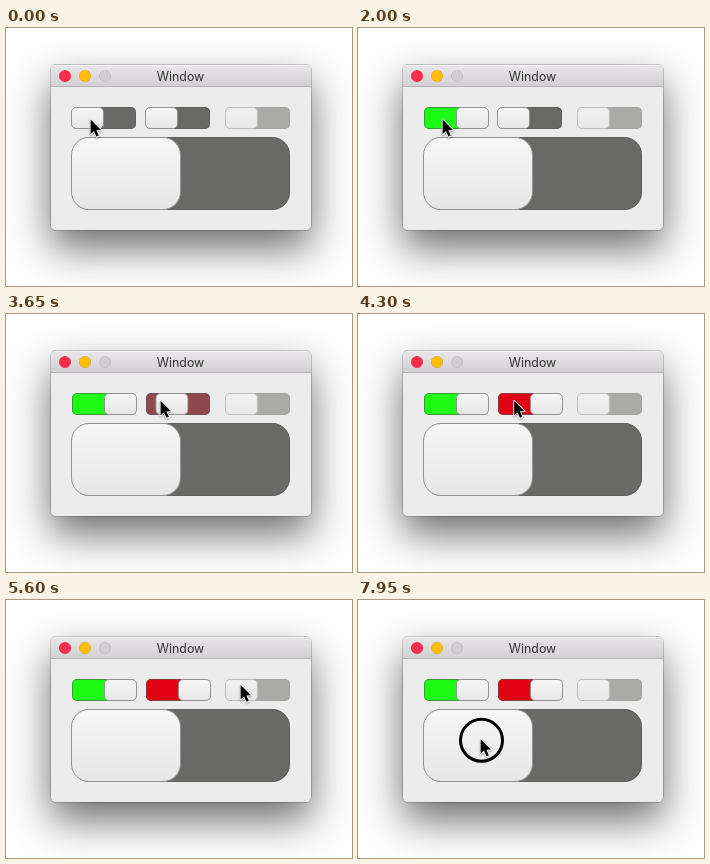
Write an HTML page with a canvas that moves like this. It is 346 px wide and 258 px high and loops after 8 s.

```html
<!DOCTYPE html>
<html lang="en">
<head>
<meta charset="utf-8">
<title>Window</title>
<style>
html, body { margin: 0; width: 100%; height: 100%; overflow: hidden; background: #fff; }
canvas { display: block; width: 346px; height: 258px; }
#title {
  position: absolute; left: 45px; top: 40px; width: 259px;
  font: 400 12.4px/17px Inter, sans-serif; color: #333; text-align: center;
}
</style>
</head>
<body>
<canvas id="stage"></canvas>
<div id="title">Window</div>
<script>
const W = 346, H = 258, LOOP = 8000, STEP = 50;
const canvas = document.getElementById('stage');
const ctx = canvas.getContext('2d');
const dpr = window.devicePixelRatio || 1;
canvas.width = W * dpr;
canvas.height = H * dpr;

const GRAY = [105, 105, 103], GREEN = [28, 252, 20], RED = [226, 0, 20];

// Pointer legs: start, end, from, to, easing power
const legs = [
  [2250, 2850, [84.2, 91.2], [154.2, 86.4], 0.9],
  [4250, 5050, [154.2, 86.4], [234.2, 84.4], 0.9],
  [6400, 7250, [234.2, 84.4], [132, 138.8], 0.8],
  [7250, 7450, [132, 138.8], [122.2, 138.8], 1]
];
// Presses: start of fade in, start of fade out
const presses = [[1100, 1500], [3150, 3450], [5300, 5450], [7800, 9000]];
const FADE = 150;

const progress = (t, a, b) => Math.min(1, Math.max(0, (t - a) / (b - a)));
const smooth = p => p * p * (3 - 2 * p);
const mix = (a, b, p) => a + (b - a) * p;

function roundRect(x, y, w, h, r) {
  ctx.beginPath();
  ctx.roundRect(x, y, w, h, r);
}

function vertical(y, h, top, bottom) {
  const g = ctx.createLinearGradient(0, y, 0, y + h);
  g.addColorStop(0, top);
  g.addColorStop(1, bottom);
  return g;
}

function drawWindow() {
  ctx.fillStyle = '#fff';
  ctx.fillRect(0, 0, W, H);

  ctx.save();
  ctx.shadowColor = 'rgba(0,0,0,0.58)';
  ctx.shadowBlur = 40 * dpr;
  ctx.shadowOffsetY = 18 * dpr;
  ctx.fillStyle = '#ececec';
  roundRect(45, 37, 260, 165, 5);
  ctx.fill();
  ctx.restore();

  ctx.strokeStyle = 'rgba(0,0,0,0.18)';
  ctx.lineWidth = 1;
  roundRect(44.5, 36.5, 261, 166, 5.5);
  ctx.stroke();
  ctx.fillStyle = '#ececec';
  roundRect(45, 37, 260, 165, 5);
  ctx.fill();

  ctx.fillStyle = vertical(37, 21, '#e9e7e9', '#d2d0d2');
  roundRect(45, 37, 260, 21, [5, 5, 0, 0]);
  ctx.fill();
  ctx.fillStyle = '#f5f4f5';
  ctx.fillRect(49, 37, 252, 1);
  ctx.fillStyle = '#b4b2b4';
  ctx.fillRect(45, 58, 260, 1);

  const lights = [['#ff2c50', '#e0203f'], ['#ffbf08', '#e0a300'], ['#d0ced0', '#bcbabc']];
  lights.forEach(([fill, edge], i) => {
    ctx.beginPath();
    ctx.arc(59 + 20 * i, 48, 5.6, 0, 7);
    ctx.fillStyle = fill;
    ctx.fill();
    ctx.strokeStyle = edge;
    ctx.lineWidth = 0.7;
    ctx.stroke();
  });
}

function drawSwitch(x, y, w, h, r, on, color, disabled) {
  const rgb = GRAY.map((c, i) => Math.round(mix(c, color[i], on)));
  ctx.fillStyle = `rgb(${rgb})`;
  roundRect(x, y, w, h, r);
  ctx.fill();
  ctx.strokeStyle = 'rgba(90,90,90,0.65)';
  ctx.lineWidth = 1;
  roundRect(x + 0.5, y + 0.5, w - 1, h - 1, r - 0.5);
  ctx.stroke();

  const kw = w / 2 + 1;
  const kx = mix(x - 1, x + w / 2, on);
  ctx.fillStyle = vertical(y, h, '#f7f7f7', '#e6e6e6');
  roundRect(kx + 0.5, y + 0.5, kw - 1, h - 1, r - 0.5);
  ctx.fill();
  ctx.strokeStyle = '#929292';
  ctx.stroke();

  if (disabled) {
    ctx.fillStyle = 'rgba(236,236,236,0.5)';
    ctx.fillRect(x - 2, y - 1, w + 4, h + 2);
  }
}

function pointerAt(t) {
  let pos = legs[0][2];
  for (const [a, b, from, to, power] of legs) {
    if (t < a) break;
    const p = smooth(Math.pow(progress(t, a, b), power));
    pos = [mix(from[0], to[0], p), mix(from[1], to[1], p)];
  }
  return pos;
}

function drawRing(x, y, t) {
  for (const [down, up] of presses) {
    const alpha = progress(t, down, down + FADE) - progress(t, up, up + FADE);
    if (alpha <= 0) continue;
    ctx.globalAlpha = alpha;
    ctx.beginPath();
    ctx.arc(x + 1.3, y + 1.5, 21, 0, 7);
    ctx.strokeStyle = '#000';
    ctx.lineWidth = 3;
    ctx.stroke();
    ctx.globalAlpha = 1;
  }
}

function drawPointer(x, y) {
  const points = [[0, 0], [0, 14.6], [3.4, 11.4], [5.8, 17], [8.2, 16], [5.8, 10.6], [10.4, 10.4]];
  ctx.save();
  ctx.translate(x + 0.4, y + 0.4);
  ctx.beginPath();
  points.forEach(([px, py]) => ctx.lineTo(px, py));
  ctx.closePath();
  ctx.shadowColor = 'rgba(0,0,0,0.35)';
  ctx.shadowBlur = 2 * dpr;
  ctx.shadowOffsetY = dpr;
  ctx.lineJoin = 'round';
  ctx.lineWidth = 1.8;
  ctx.strokeStyle = '#fff';
  ctx.stroke();
  ctx.shadowColor = 'transparent';
  ctx.fillStyle = '#000';
  ctx.fill();
  ctx.restore();
}

function draw(t) {
  ctx.setTransform(dpr, 0, 0, dpr, 0, 0);
  drawWindow();
  drawSwitch(66, 79, 64, 22, 5, smooth(progress(t, 1550, 1950)), GREEN);
  drawSwitch(140, 79, 64, 22, 5, smooth(progress(t, 3500, 3900)), RED);
  drawSwitch(220, 79, 64, 22, 5, 0, GRAY, true);
  drawSwitch(66, 109, 218, 73, 18, 0, GRAY);
  const [x, y] = pointerAt(t);
  drawRing(x, y, t);
  drawPointer(x, y);
}

const start = performance.now();
function tick() {
  const t = (performance.now() - start) % LOOP;
  draw(Math.floor(t / STEP) * STEP);
  requestAnimationFrame(tick);
}
tick();
</script>
</body>
</html>
```
